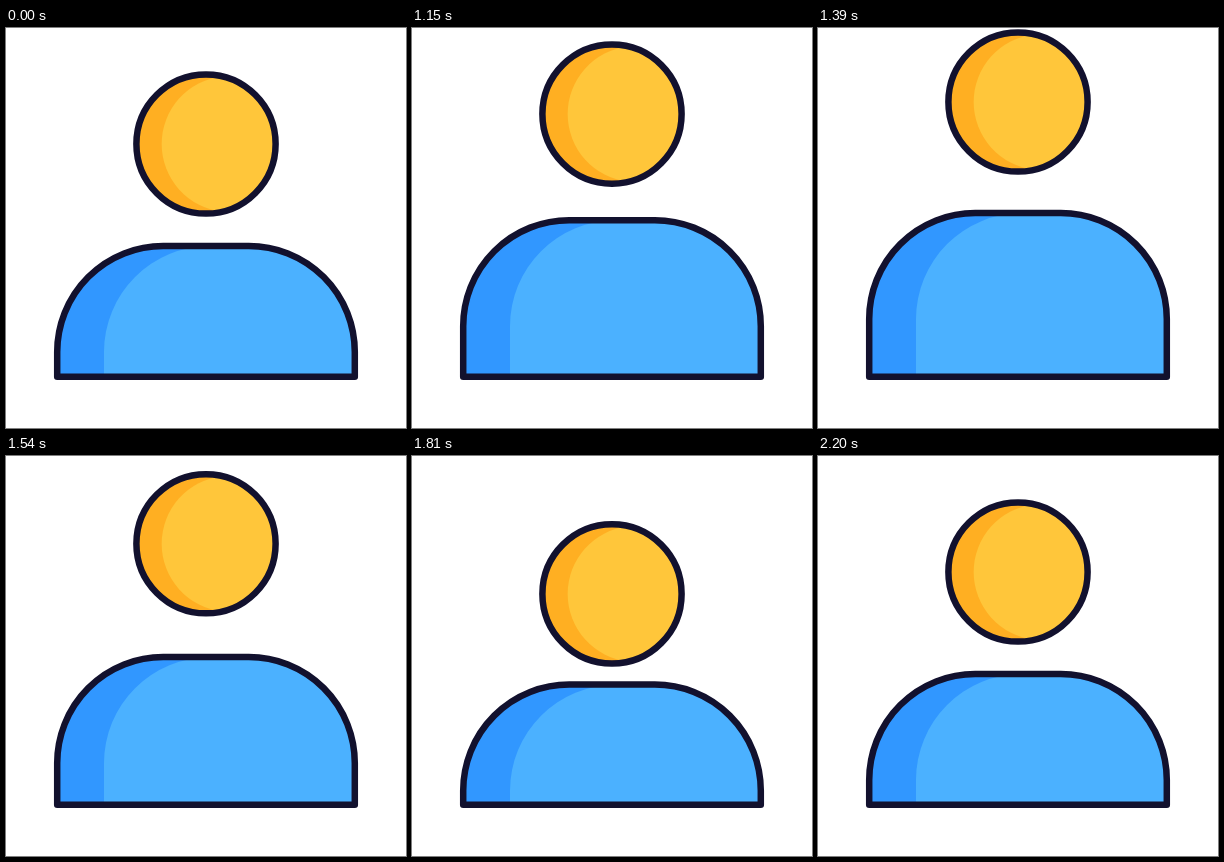
Recreate the animation shown at these times as an HTML page. Size 400 by 400 pixels, loop 2.23 s.

```html
<!DOCTYPE html>
<html lang="en">
<head>
<meta charset="utf-8">
<title>User icon</title>
<style>
  html, body { margin: 0; width: 100%; height: 100%; overflow: hidden; background: #fff; }
  svg { display: block; width: 100vw; height: 100vh; }
  .line { fill: none; stroke: #12112e; stroke-width: 6.5; stroke-linejoin: round; }
</style>
</head>
<body>
<svg viewBox="0 0 400 400">
  <g id="head">
    <circle r="69.6" fill="#ffaf22"/>
    <path d="M16.3 -67.6A69.6 69.6 0 0 1 16.3 67.6A68 68 0 0 1 16.3 -67.6Z" fill="#ffc63a"/>
    <circle class="line" r="69.6"/>
  </g>
  <path id="shade" fill="#3197ff"/>
  <path id="light" fill="#4bb1ff"/>
  <path id="outline" class="line"/>
</svg>
<script>
const LOOP = 2230, HOLD = 1030, STEP = 30;
const LEFT = 51.2, RIGHT = 348.8, BASE = 348.8, R = 106;
const el = id => document.getElementById(id);
const head = el('head'), shade = el('shade'), light = el('light'), outline = el('outline');

const easeOut = x => 1 - (1 - x) ** 3;

// Cubic bezier (.6, 0, .2, 1), solved by bisection
function swing(x) {
  let lo = 0, hi = 1;
  for (let i = 0; i < 24; i++) {
    const s = (lo + hi) / 2, u = 1 - s;
    if (1.8 * u * u * s + 0.6 * u * s * s + s * s * s < x) lo = s;
    else hi = s;
  }
  return lo * lo * (3 - 2 * lo);
}

// Keys are [time, value, easing towards this key]
const headKeys = [[1024, 116], [1395, 74, easeOut], [1836, 138, swing], [2190, 116, swing]];
const bodyKeys = [[1003, 218], [1372, 185, easeOut], [1807, 228.6, swing], [2185, 218, swing]];

function valueAt(keys, t) {
  if (t < HOLD) return keys[0][1];
  for (let i = 1; i < keys.length; i++) {
    const [t0, v0] = keys[i - 1], [t1, v1, ease] = keys[i];
    if (t < t1) return v0 + (v1 - v0) * ease((t - t0) / (t1 - t0));
  }
  return keys[keys.length - 1][1];
}

function shoulders(left, top) {
  const side = top + R;
  return `M${left} ${BASE}V${side}A${R} ${R} 0 0 1 ${left + R} ${top}` +
    `H${RIGHT - R}A${R} ${R} 0 0 1 ${RIGHT} ${side}V${BASE}Z`;
}

function draw(t) {
  if (t >= HOLD) t = HOLD + Math.floor((t - HOLD) / STEP) * STEP;
  const top = valueAt(bodyKeys, t), d = shoulders(LEFT, top);
  head.setAttribute('transform', `translate(200 ${valueAt(headKeys, t)})`);
  shade.setAttribute('d', d);
  outline.setAttribute('d', d);
  light.setAttribute('d', shoulders(98, top));
}

let start = null;
function tick(now) {
  if (start === null) start = now;
  draw((now - start) % LOOP);
  requestAnimationFrame(tick);
}
draw(0);
requestAnimationFrame(tick);
</script>
</body>
</html>
```
